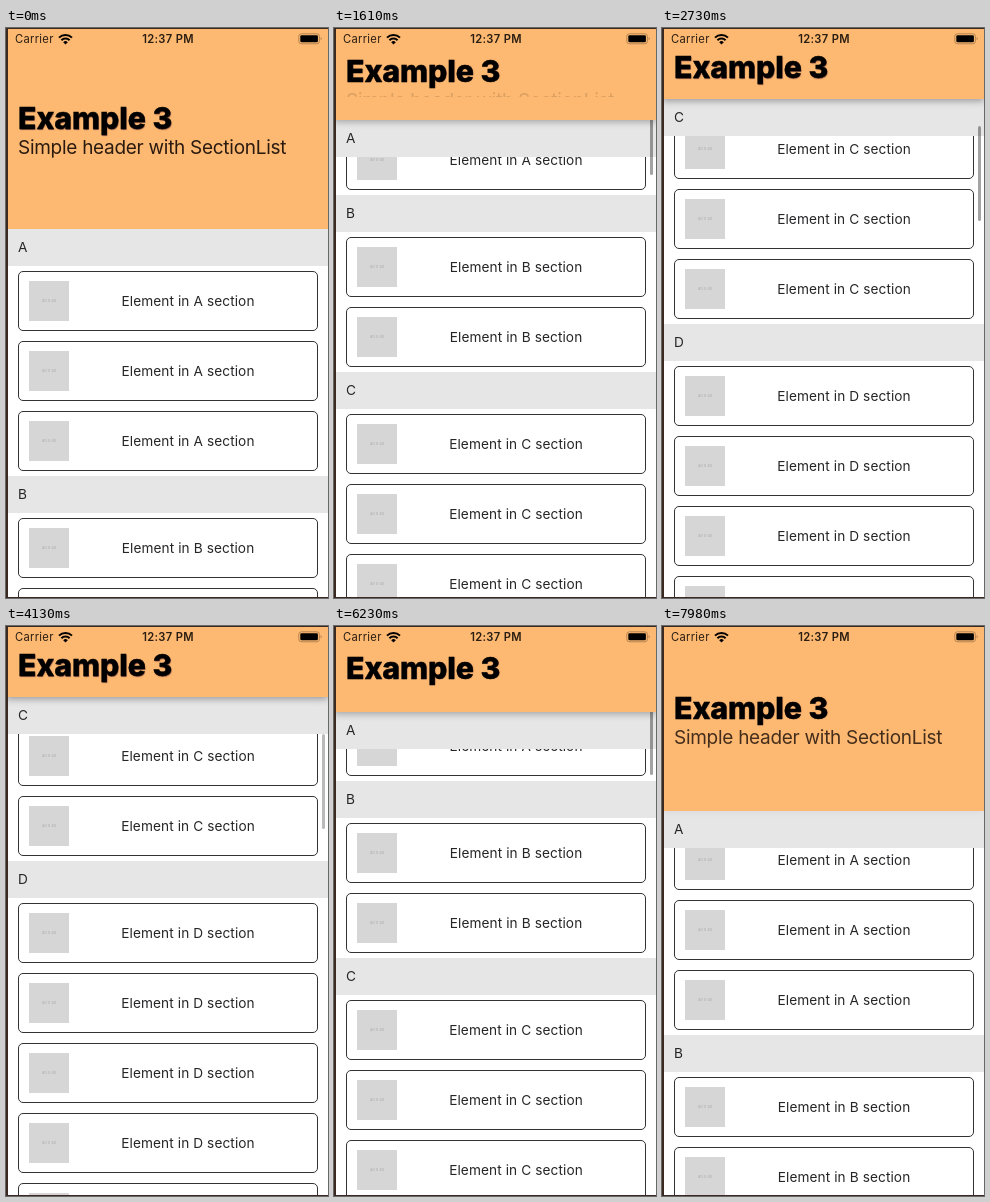
Animation, 322 px wide and 570 px high, one loop 8000 ms. Source, as an HTML page:

```html
<!DOCTYPE html>
<html lang="en">
<head>
<meta charset="utf-8">
<title>Collapsing header</title>
<style>
  html, body { margin: 0; width: 100%; height: 100%; overflow: hidden; background: #fff; }
  #stage { position: relative; width: 322px; height: 570px; overflow: hidden; background: #fff;
    font-family: Inter, "Liberation Sans", sans-serif; color: #262628; }
  #stage div, #stage svg { position: absolute; box-sizing: border-box; white-space: nowrap; }
  #list { left: 0; top: 0; width: 322px; }
  .card { left: 12px; width: 300px; height: 60px; border: 1px solid #333; border-radius: 5px; background: #fff; }
  .thumb { left: 10px; top: 9px; width: 40px; height: 40px; background: #d6d6d6; color: #aaa;
    font-size: 4px; line-height: 40px; text-align: center; }
  .label { left: 50px; right: 10px; top: 0; line-height: 58px; text-align: center; font-size: 13.65px;
    letter-spacing: .1px; }
  .head { left: 0; width: 322px; height: 37px; padding-left: 12px; background: #e6e6e6;
    line-height: 37px; font-size: 13.65px; }
  #knob { left: 316px; width: 3px; height: 95px; border-radius: 2px; background: rgba(0, 0, 0, .36); }
  #top { left: 0; top: 0; width: 322px; background: #fdb971; }
  #shade { inset: 0; box-shadow: 0 2px 7px rgba(0, 0, 0, .34); }
  #title { left: 12px; top: 71.5px; line-height: 36px; font-size: 30.2px; font-weight: 800; color: #000;
    -webkit-text-stroke: .4px #000; text-shadow: .5px .5px 1px rgba(70, 20, 40, .6); }
  #sub { left: 12px; top: 107.5px; line-height: 24px; font-size: 19px; letter-spacing: -.28px; color: #2a1a10; }
  .bar { top: 4px; line-height: 15px; font-size: 11.2px; letter-spacing: .3px; color: #2a1d12; }
  #edge { inset: 0; border: solid #3a2a22; border-width: 1px 0 1px 2px; }
</style>
</head>
<body>
<div id="stage">
  <div id="list"></div>
  <div id="knob"></div>
  <div id="top">
    <div id="shade"></div>
    <div id="title">Example 3</div>
    <div id="sub">Simple header with SectionList</div>
  </div>
  <div class="bar" style="left:9px">Carrier</div>
  <svg style="left:52px;top:5px" width="15" height="12" viewBox="0 0 15 12" fill="none" stroke="#000" stroke-width="2">
    <path d="M1 4.6A9.2 9.2 0 0 1 14 4.6M3.4 7.2A5.8 5.8 0 0 1 11.6 7.2"/>
    <path d="M7.5 11.6L5.2 9.2A3.3 3.3 0 0 1 9.8 9.2Z" fill="#000" stroke="none"/>
  </svg>
  <div class="bar" style="left:0;width:324px;text-align:center;font-weight:600">12:37 PM</div>
  <svg style="left:292px;top:5px" width="25" height="12" viewBox="0 0 25 12">
    <rect x=".8" y=".8" width="20.6" height="10" rx="2.6" fill="none" stroke="#b58350"/>
    <rect x="2.3" y="2.3" width="17.6" height="7" rx="1.3"/>
    <path d="M22.6 4a2 2 0 0 1 0 3.6z" fill="#b58350"/>
  </svg>
  <div id="edge"></div>
</div>
<script>
const LOOP = 8000, STEP = 70, OPEN = 201, RANGE = 130, HEAD = 37, ROW = 70;
const LAG = 6; // the header trails the list by a few ms
const sections = [["A", 3], ["B", 2], ["C", 3], ["D", 8]];
// time, scroll offset, velocity in px per ms
const path = [
  [770, 0, 0], [1610, 281, .32], [2730, 576, .27], [3010, 637, 0],
  [4620, 637, 0], [5530, 356, -.2], [6230, 293, -.08], [6960, 240, 0],
  [7070, 240, 0], [7980, 39, -.47]
];
const $ = id => document.getElementById(id);
const clamp = (v, lo, hi) => Math.min(hi, Math.max(lo, v));

function add(parent, cls, text = "") {
  const el = document.createElement("div");
  el.className = cls;
  el.textContent = text;
  return parent.appendChild(el);
}

const heads = [];
let y = OPEN;
for (const [name, count] of sections) {
  heads.push({ y, name });
  y += HEAD;
  for (let i = 0; i < count; i++, y += ROW) {
    const card = add($("list"), "card");
    card.style.top = y + 5 + "px";
    add(card, "thumb", "40 x 40");
    add(card, "label", `Element in ${name} section`);
  }
}
for (const h of heads) h.el = add($("list"), "head", h.name);

function scrollAt(t) {
  if (t <= path[0][0]) return path[0][1];
  const i = path.findIndex(k => k[0] >= t);
  if (i < 0) return path[path.length - 1][1];
  const [t0, a, va] = path[i - 1], [t1, b, vb] = path[i];
  const d = t1 - t0, u = (t - t0) / d, w = 1 - u;
  return w * w * (1 + 2 * u) * a + u * u * (3 - 2 * u) * b + d * u * w * (w * va - u * vb);
}

function draw(t) {
  const s = Math.round(scrollAt(t));
  const shrink = clamp(scrollAt(t - LAG) * .392, 0, RANGE);
  const bottom = Math.round(OPEN - shrink);

  $("list").style.transform = `translateY(${-s}px)`;
  heads.forEach((h, i) => {
    const next = heads[i + 1];
    const limit = next ? next.y - HEAD : Infinity;
    h.el.style.top = Math.max(h.y, Math.min(bottom + s, limit)) + "px";
  });

  $("top").style.height = bottom + "px";
  $("shade").style.opacity = shrink / RANGE;
  // The title block stays centred until it meets the status bar
  const lift = Math.min(shrink / 2, 47 + (shrink - 109) * .19);
  $("title").style.transform = $("sub").style.transform = `translateY(${-lift}px)`;
  $("sub").style.opacity = 1 - shrink / RANGE;
  $("sub").style.clipPath = `inset(0 0 ${Math.max(0, 154.5 - lift - bottom)}px 0)`;

  $("knob").style.top = 7.9 + s * .157 + "px";
  const fade = t < 4690 ? 1 - (t - 4060) / 280 : 1;
  $("knob").style.opacity = s > 0 ? clamp(fade, 0, 1) : 0;
}

const start = performance.now();
function tick() {
  const t = (performance.now() - start) % LOOP;
  draw(Math.floor(t / STEP) * STEP);
  requestAnimationFrame(tick);
}
tick();
</script>
</body>
</html>
```
